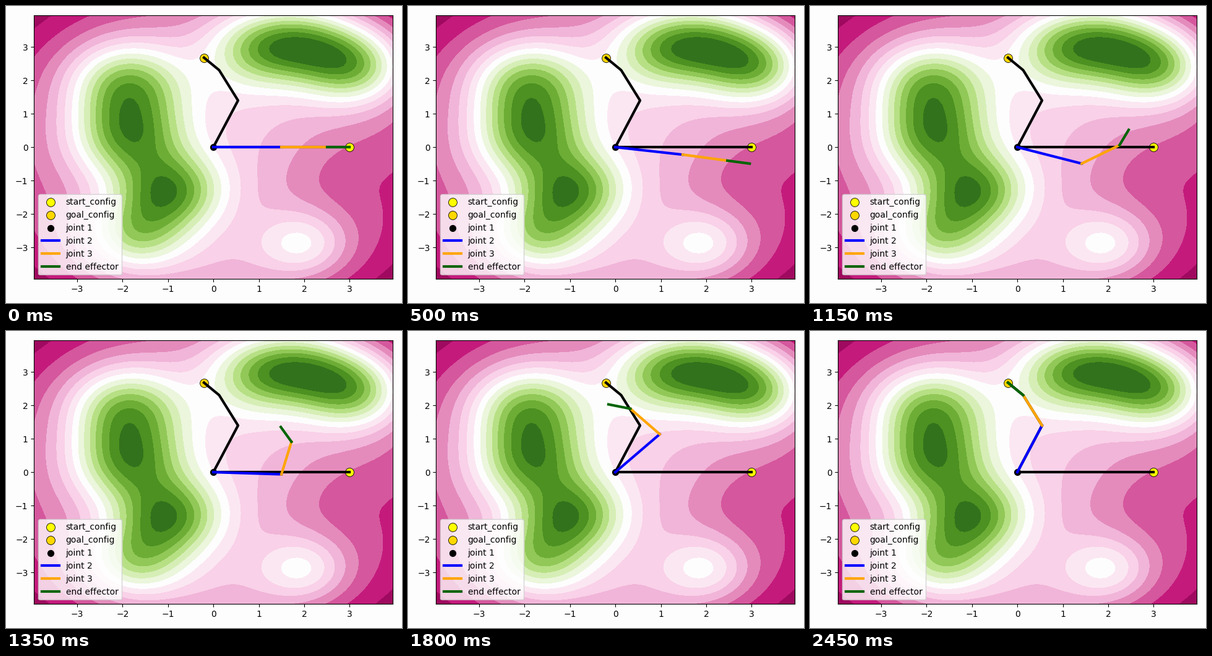
A matplotlib script that plays this animation: 640 px wide and 480 px high, repeating every 2.5 s.

```python
import numpy as np
import matplotlib.pyplot as plt
from matplotlib.animation import FuncAnimation

W, H, DPI = 640, 480, 100
FRAMES, INTERVAL = 50, 50
LIM = 3.95
BANDS = 15
PAPER = "#fdfdfd"
LINKS = (1.5, 1.0, 0.5)
START, GOAL = (0, 0, 0), (1.2, 0.8, 0.3)

# Gaussian hills of the cost surface: x, y, height, width.
HILLS = [
    (-1.93, 1.9, 7.5, 0.85), (-1.87, 0.3, 7.7, 0.85),    # left ridge
    (-0.95, -1.3, 8.0, 0.8), (-1.72, -2.65, 6.6, 0.8),
    (1.05, 3.0, 6.4, 0.8), (2.1, 3.15, 6.2, 0.8),        # top right ridge
    (3.1, 2.45, 8.3, 0.8),
    (1.97, -2.92, 4.0, 0.68),                            # small mound
    (0.1, 2.0, 1.0, 1.2), (0.3, -3.7, 1.3, 1.0),         # gentle swells
    (2.8, -0.9, -1.3, 1.0),                              # hollow
]

# Key poses of the arm: frame, then three joint angles in radians.
POSES = np.array([
    (0, *START),
    (10, -0.15, -0.03, 0.0),
    (15, -0.314, 0.07, 0.15),
    (23, -0.334, 0.92, 0.57),
    (32, 0.478, 1.64, 0.73),
    (41, 1.17, 0.97, 0.41),
    (49, *GOAL),
])


def cost_surface(n=80):
    axis = np.linspace(-LIM, LIM, n)
    x, y = np.meshgrid(axis, axis)
    z = 5 - 0.145 * (x ** 2 + y ** 2)
    for cx, cy, height, width in HILLS:
        z += height * np.exp(-((x - cx) ** 2 + (y - cy) ** 2) / (2 * width ** 2))
    return x, y, np.clip(z, 0.01, BANDS - 0.01)


def band_colors():
    colors = list(plt.get_cmap("PiYG")((np.arange(BANDS) + 0.5) / BANDS))
    colors[BANDS // 2] = PAPER
    return colors


def spline(t, knots, values):
    """Natural cubic spline through the knots."""
    def basis(s):
        return np.abs(s[:, None] - knots) ** 3, np.vander(s, 2)

    cubes, trend = basis(knots)
    system = np.block([[cubes, trend], [trend.T, np.zeros((2, 2))]])
    rhs = np.vstack([values, np.zeros((2, values.shape[1]))])
    return np.hstack(basis(t)) @ np.linalg.solve(system, rhs)


def arm(q):
    """Joint positions as x and y arrays, base first."""
    heading = np.cumsum(q)
    x = np.cumsum(np.r_[0, LINKS * np.cos(heading)])
    y = np.cumsum(np.r_[0, LINKS * np.sin(heading)])
    return x, y


last = FRAMES - 1
poses = spline(np.arange(FRAMES) / last, POSES[:, 0] / last, POSES[:, 1:])

fig, ax = plt.subplots(figsize=(W / DPI, H / DPI), dpi=DPI, facecolor=PAPER)
ax.contourf(*cost_surface(), levels=np.arange(BANDS + 1), colors=band_colors())
ax.set(xlim=(-LIM, LIM), ylim=(-LIM, LIM),
       xticks=range(-3, 4), yticks=range(-3, 4))

handles = []
for q, color, label in ((START, "yellow", "start_config"),
                        (GOAL, "gold", "goal_config")):
    x, y = arm(q)
    ax.plot(x, y, color="black", lw=3)
    handles.append(ax.scatter(x[-1], y[-1], s=100, c=color, edgecolors="black",
                              linewidths=0.6, label=label))
handles.append(ax.scatter(0, 0, s=50, c="black", label="joint 1"))

links = [ax.plot([], [], color=color, lw=3, label=label)[0]
         for color, label in (("blue", "joint 2"), ("orange", "joint 3"),
                              ("darkgreen", "end effector"))]
ax.legend(handles=handles + links, loc="lower left")
fig.tight_layout()


def update(i):
    x, y = arm(poses[i])
    for k, link in enumerate(links):
        link.set_data(x[k:k + 2], y[k:k + 2])
    return links


anim = FuncAnimation(fig, update, frames=FRAMES, interval=INTERVAL,
                     repeat=True, repeat_delay=0)
plt.show()
```
